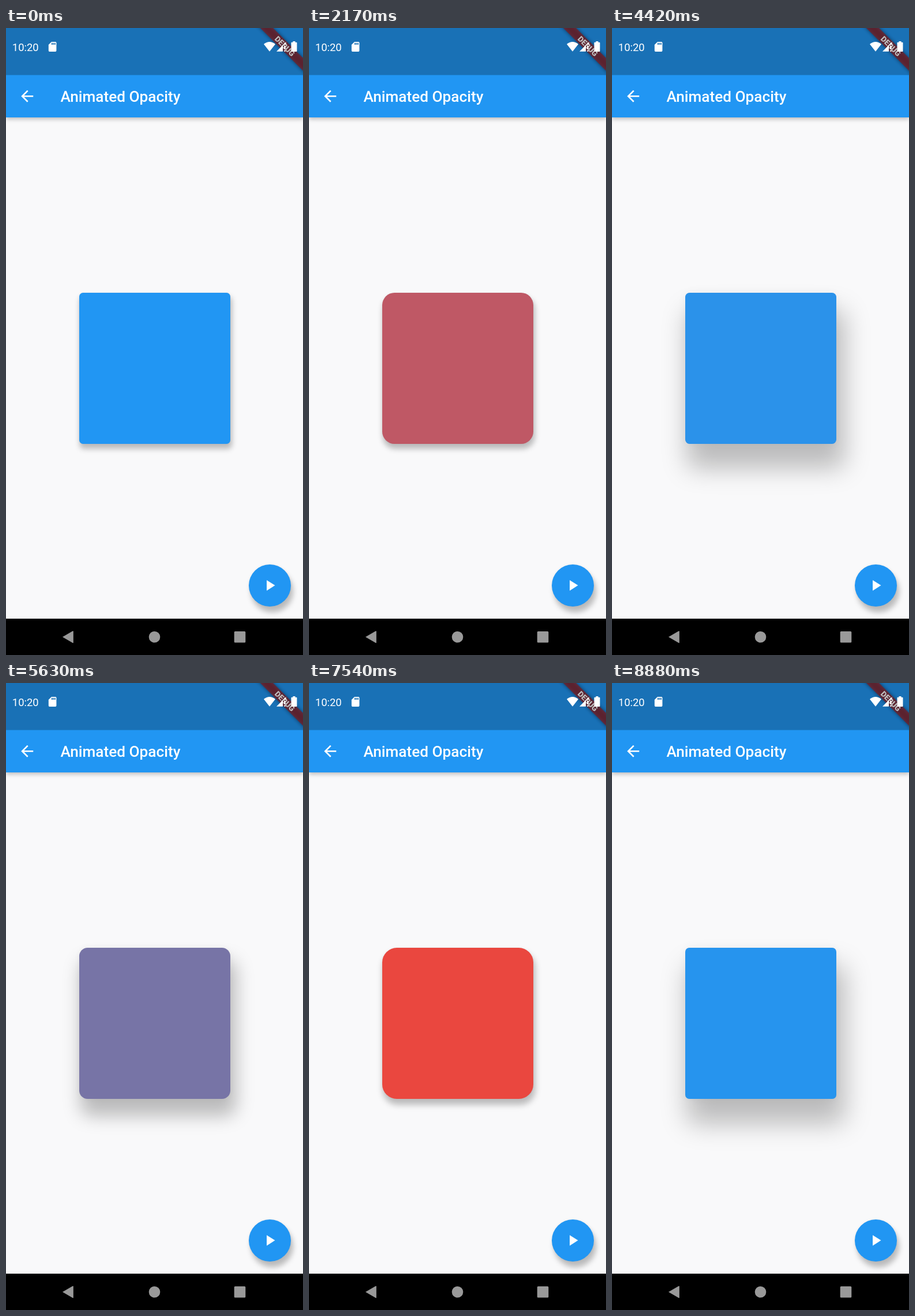
Animation, 515 px wide and 1087 px high, one loop 8.92 s. Source, as an HTML page:

```html
<!DOCTYPE html>
<html lang="en">
<head>
<meta charset="utf-8">
<title>Animated Opacity</title>
<style>
  /* --e is the card's elevation in dp; its shadow follows from it */
  @property --e { syntax: "<number>"; inherits: false; initial-value: 5; }

  html, body { margin: 0; width: 100%; height: 100%; overflow: hidden; }
  body { position: relative; background: #f9f9fa; font-family: Roboto, sans-serif; }
  div, svg { position: absolute; }
  svg { left: 0; top: 0; }

  .bar {
    left: 0; top: 0; width: 515px; height: 154.7px;
    background: #2196f3;
    box-shadow: 0 3px 7px rgba(0, 0, 0, .25);
  }
  .fab {
    left: 420.6px; top: 929.6px; width: 73.4px; height: 73.4px;
    border-radius: 50%;
    background: #2196f3;
    box-shadow: 4px 10px 10px rgba(0, 0, 0, .25), 0 0 4px rgba(0, 0, 0, .06);
  }
  .card {
    left: 126.5px; top: 458.5px; width: 262px; height: 262px;
    box-shadow:
      calc(var(--e) * .362px) calc(var(--e) * 1.52px) calc(var(--e) * 1.82px)
        calc(var(--e) * .228px) rgba(0, 0, 0, .25),
      0 0 calc(var(--e) * .65px) rgba(0, 0, 0, .04);
    animation: card 8.92s infinite;
  }

  /* Two-second fast-out-slow-in moves; the first red one and the last blue one are cut short */
  @keyframes card {
    0% {
      --e: 5; background: #2196f3; border-radius: 6.5px;
      animation-timing-function: linear;
    }
    13.543% {
      --e: 5; background: #2196f3; border-radius: 6.5px;
      animation-timing-function: cubic-bezier(.432, 0, .253, .898);
    }
    33.128% {
      --e: 5; background: #f24438; border-radius: 26px;
      animation-timing-function: cubic-bezier(.4, 0, .2, 1);
    }
    55.549% {
      --e: 25; background: #2196f3; border-radius: 6.5px;
      animation-timing-function: linear;
    }
    56.054% {
      --e: 25; background: #2196f3; border-radius: 6.5px;
      animation-timing-function: cubic-bezier(.4, 0, .2, 1);
    }
    78.475% {
      --e: 5; background: #f44336; border-radius: 26.2px;
      animation-timing-function: linear;
    }
    81.67% {
      --e: 5; background: #f44336; border-radius: 26.2px;
      animation-timing-function: cubic-bezier(.448, 0, .281, .855);
    }
    100% { --e: 24.6; background: #2594ef; border-radius: 6.9px; }
  }
</style>
</head>
<body>
<div class="bar"></div>
<div class="card"></div>
<div class="fab"></div>

<svg width="515" height="1087" viewBox="0 0 515 1087" fill="#fff">
  <defs>
    <filter id="soft" x="-20%" y="-80%" width="140%" height="260%">
      <feGaussianBlur stdDeviation="3"/>
    </filter>
  </defs>

  <!-- app bar and play button -->
  <path transform="translate(21 102.5) scale(1.311)"
    d="M20 11H7.83l5.59-5.59L12 4l-8 8 8 8 1.41-1.41L7.83 13H20z"/>
  <text x="94.4" y="128" font-size="26.2" font-weight="500">Animated Opacity</text>
  <path transform="translate(441.6 950.6) scale(1.311)" d="M8 5v14l11-7z"/>

  <!-- corner ribbon -->
  <g transform="translate(515 0) rotate(45)">
    <rect x="-80" y="36.7" width="160" height="15.7" fill="#000" opacity=".5" filter="url(#soft)"/>
    <rect x="-80" y="36.7" width="160" height="15.7" fill="#b71c1c" opacity=".63"/>
    <text y="49.3" font-size="13.4" font-weight="900" text-anchor="middle">DEBUG</text>
  </g>

  <!-- status bar -->
  <rect width="515" height="81.6" fill="#000" opacity=".25"/>
  <text x="10.8" y="39.7" font-size="18.4">10:20</text>
  <path transform="translate(70.4 22.3) scale(.85)"
    d="M18 2h-8L4 8v12q0 2 2 2h12q2 0 2-2V4q0-2-2-2zm-6 6h-2V4h2zm3 0h-2V4h2zm3 0h-2V4h2z"/>
  <path d="M447 28Q457 20 467 28L457 40.8z"/>
  <path d="M469 40.8L485.5 24V29H480V40.8zM482.2 31h2.4v6h-2.4zM482.2 38.4h2.4v2.4h-2.4z"/>
  <path d="M497.5 23h4v1.8h2q1 0 1 1V40q0 1-1 1h-8q-1 0-1-1V25.8q0-1 1-1h2z"/>

  <!-- navigation bar -->
  <rect y="1024" width="515" height="63" fill="#000"/>
  <g fill="#999">
    <path d="M98 1055.8L115.6 1045.6Q116.8 1045 116.8 1046.3V1065.3Q116.8 1066.6 115.6 1066z"/>
    <circle cx="257.5" cy="1055.7" r="9.8"/>
    <rect x="395.7" y="1046" width="19.6" height="19.6" rx="1.6"/>
  </g>
</svg>
</body>
</html>
```
